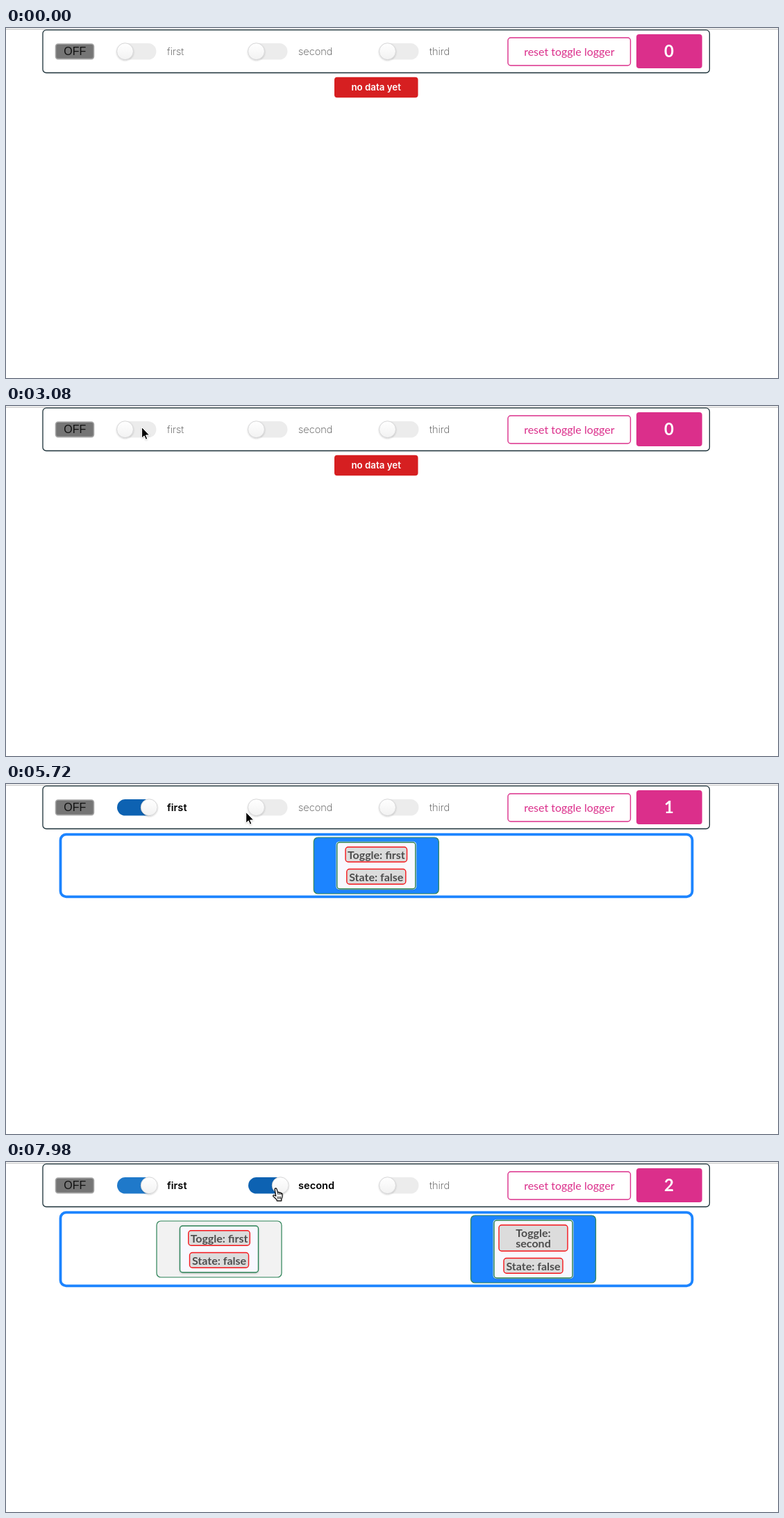
These frames come from a looping animation (1112x504 px, 8000 ms). An HTML page:

```html
<!DOCTYPE html>
<html lang="en">
<head>
<meta charset="utf-8">
<title>Toggle logger</title>
<style>
  html, body { margin: 0; width: 100%; height: 100%; overflow: hidden; background: #fff; }
  svg { display: block; width: 1112px; height: 504px; }
  text { text-anchor: middle; }
  .lato { font-family: Lato, sans-serif; }
  .label { font: 200 14.6px Inter, sans-serif; text-anchor: start; fill: #444; }
  .label.on { font-weight: 600; fill: #000; }
  .chip text { font: 700 16px Lato, sans-serif; fill: #4d4d4d; }
  .chip rect { fill: #dcdcdc; stroke: #f5161b; stroke-width: 1.4; }
</style>
</head>
<body>
<svg viewBox="0 0 1112 504">
  <defs>
    <linearGradient id="shine" x2="0" y2="1">
      <stop offset="0" stop-color="#fff"/><stop offset="1" stop-color="#f2f2f2"/>
    </linearGradient>
    <filter id="soft" x="-30%" y="-30%" width="160%" height="160%">
      <feDropShadow dx="0" dy="1" stdDeviation="1" flood-opacity=".2"/>
    </filter>
  </defs>
  <rect y="1" width="1112" height="1.4" fill="#cdcdcd"/>
  <rect x="53" y="2.9" width="960.4" height="61.6" rx="5" fill="#fff" stroke="#1b3038" stroke-width="1.3"/>
  <rect x="71.5" y="23" width="55" height="21.6" rx="3.5" fill="#757575" stroke="#a8a8a8" stroke-width="1.6"/>
  <text x="99.3" y="39" font-family="Liberation Sans, Arial, sans-serif" font-size="16" fill="#111">OFF</text>
  <g id="toggles"></g>
  <rect x="723" y="14" width="176.5" height="40" rx="4" fill="#fff" stroke="#db2f8b" stroke-width="1.4"/>
  <text class="lato" x="811.3" y="40" font-size="16" fill="#db2f8b">reset toggle logger</text>
  <rect x="908" y="9" width="94.7" height="49" rx="4" fill="#db2f8b"/>
  <text id="count" class="lato" x="955" y="42.4" font-size="24" font-weight="700" fill="#fff"></text>
  <g id="empty">
    <rect x="473" y="70.7" width="120.5" height="29.5" rx="4" fill="#d61f21"/>
    <text x="533.2" y="90.2" font-family="Inter, sans-serif" font-size="13.3" font-weight="600" fill="#fff">no data yet</text>
  </g>
  <g id="log1"></g>
  <g id="log2"></g>
  <g id="cursor" stroke-linejoin="round" stroke-linecap="round" filter="url(#soft)">
    <path id="arrow" d="M.6 .8V16.2L4.1 12.9 6.4 18.3 8.8 17.3 6.5 12H11.3Z" fill="#000" stroke="#fff" stroke-width="1"/>
    <g id="hand" transform="translate(-4.5 -.5)">
      <path d="M3.2 2.4C3 .8 5.2 .3 5.9 1.9L7.5 7.2C7.9 6 9.7 6 10 7.5 10.7 6.6 12.1 7 12.3 8.3 13.3 7.8 14.3 8.6 14.2 9.8L13.9 13.4 12.7 16.4V18.8H6.3L5.7 16.9 1.2 12.6C.1 11.4 1.6 9.9 3 10.9L4.8 12.1Z" fill="#fff" stroke="#000" stroke-width="1.2"/>
      <path d="M7.5 7.2 8 9.8M10 7.5 10.2 9.8M12.3 8.3V10M7.6 13V16M9.6 13V16M11.5 13V16" fill="none" stroke="#000" stroke-width=".9"/>
    </g>
  </g>
</svg>
<script>
const LOOP = 8000, CLICK1 = 4480, CLICK2 = 7280, SLIDE = 300;
const PALE = '#ececec', GREY = '#cacaca', FOCUS = '#0d62b2', BLUE = '#1f79ca';
const $ = id => document.getElementById(id);

// time, x, y of the pointer tip
const PATH = [
  [20, 262, 454], [400, 225, 270], [820, 199, 112], [1100, 193.5, 86], [1560, 194, 73],
  [2400, 195, 40], [3080, 195, 30], [4180, 195.5, 31.5], [4850, 195.5, 31.5],
  [5250, 255, 39], [5720, 345, 40], [6040, 383, 42], [6300, 388, 42], [6460, 388.5, 37.5]
];

const names = ['first', 'second', 'third'];
$('toggles').innerHTML = names.map((name, i) => `
  <g transform="translate(${160 + 189 * i} 0)">
    <rect class="track" y="22" width="56.5" height="23.6" rx="11.8"/>
    <circle class="knob" cx="11.5" cy="33.7" r="11.9" fill="url(#shine)" stroke="#d3d3d4" stroke-width=".9" filter="url(#soft)"/>
    <text class="label" x="72" y="39.3">${name}</text>
  </g>`).join('');
const toggles = [...$('toggles').children].map(g => ({
  track: g.querySelector('.track'), knob: g.querySelector('.knob'), label: g.querySelector('.label')
}));

function chip(cx, y, w, h, ...lines) {
  const text = lines.map((s, i) => `<text x="${cx}" y="${y + 17 + 15.7 * i}">${s}</text>`).join('');
  return `<g class="chip"><rect x="${cx - w / 2}" y="${y}" width="${w}" height="${h}" rx="4"/>${text}</g>`;
}

function card(cx, y, active, tall, title) {
  const extra = tall ? 16 : 0;
  const glow = active ? `<rect x="${cx - 58}" y="${y + 5.7}" width="116" height="${69.5 + extra}" rx="5" fill="#e4eefb"/>` : '';
  return `
    <rect x="${cx - 90}" y="${y}" width="180" height="${81 + extra}" rx="6"
      fill="${active ? '#1c84ff' : '#f2f2f2'}" stroke="#2b8256" stroke-width="1.2"/>${glow}
    <rect x="${cx - 56.5}" y="${y + 7}" width="113" height="${67 + extra}" rx="4"
      fill="#f8f8ff" stroke="#2b8256" stroke-width="1.4" filter="url(#soft)"/>
    ${chip(cx, y + 13.7, tall ? 99 : 88.5, 21.6 + extra, ...title)}
    ${chip(cx, y + 45.5 + extra, 85, 21.8, 'State: false')}`;
}

const frame = h => `<rect x="78.5" y="72.7" width="910" height="${h}" rx="8" fill="#fff" stroke="#1c84ff" stroke-width="3.8"/>`;
$('log1').innerHTML = frame(89.6) + card(533.3, 77, true, false, ['Toggle: first']);
$('log2').innerHTML = frame(105.6) + card(307, 85, false, false, ['Toggle: first'])
  + card(759.5, 77, true, true, ['Toggle:', 'second']);

// cubic-bezier(.25, .1, .25, 1)
function ease(p) {
  if (p <= 0) return 0;
  if (p >= 1) return 1;
  const bez = (a, b, u) => 3 * a * u * (1 - u) ** 2 + 3 * b * u * u * (1 - u) + u ** 3;
  let lo = 0, hi = 1;
  for (let i = 0; i < 20; i++) {
    const mid = (lo + hi) / 2;
    if (bez(.25, .25, mid) < p) lo = mid; else hi = mid;
  }
  return bez(.1, 1, lo);
}

function pointAt(t) {
  const i = PATH.findIndex(p => p[0] > t);
  if (i < 0) return PATH[PATH.length - 1].slice(1);
  if (i === 0) return PATH[0].slice(1);
  const [t0, x0, y0] = PATH[i - 1], [t1, x1, y1] = PATH[i];
  const k = (t - t0) / (t1 - t0);
  return [x0 + (x1 - x0) * k, y0 + (y1 - y0) * k];
}

const show = (el, on) => el.setAttribute('display', on ? 'inline' : 'none');

function setToggle(i, color, slide, on) {
  const { track, knob, label } = toggles[i];
  track.setAttribute('fill', color);
  knob.setAttribute('cx', 11.5 + 34.7 * ease(slide));
  label.classList.toggle('on', on);
}

function render(t) {
  const on1 = t >= CLICK1, on2 = t >= CLICK2;
  setToggle(0, on2 ? BLUE : on1 ? FOCUS : t >= 4320 ? GREY : PALE, (t - CLICK1) / SLIDE, on1);
  setToggle(1, on2 ? FOCUS : t >= 6560 ? GREY : PALE, (t - CLICK2) / SLIDE, on2);
  setToggle(2, PALE, 0, false);
  $('count').textContent = on1 + on2;
  show($('empty'), !on1);
  show($('log1'), on1 && !on2);
  show($('log2'), on2);

  const hand = (t >= 4180 && t < 5280) || t >= 6460;
  show($('cursor'), t >= 20);
  show($('hand'), hand);
  show($('arrow'), !hand);
  $('cursor').setAttribute('transform', `translate(${pointAt(t).join(' ')})`);
}

const start = performance.now();
function tick() {
  render((performance.now() - start) % LOOP);
  requestAnimationFrame(tick);
}
tick();
</script>
</body>
</html>
```
